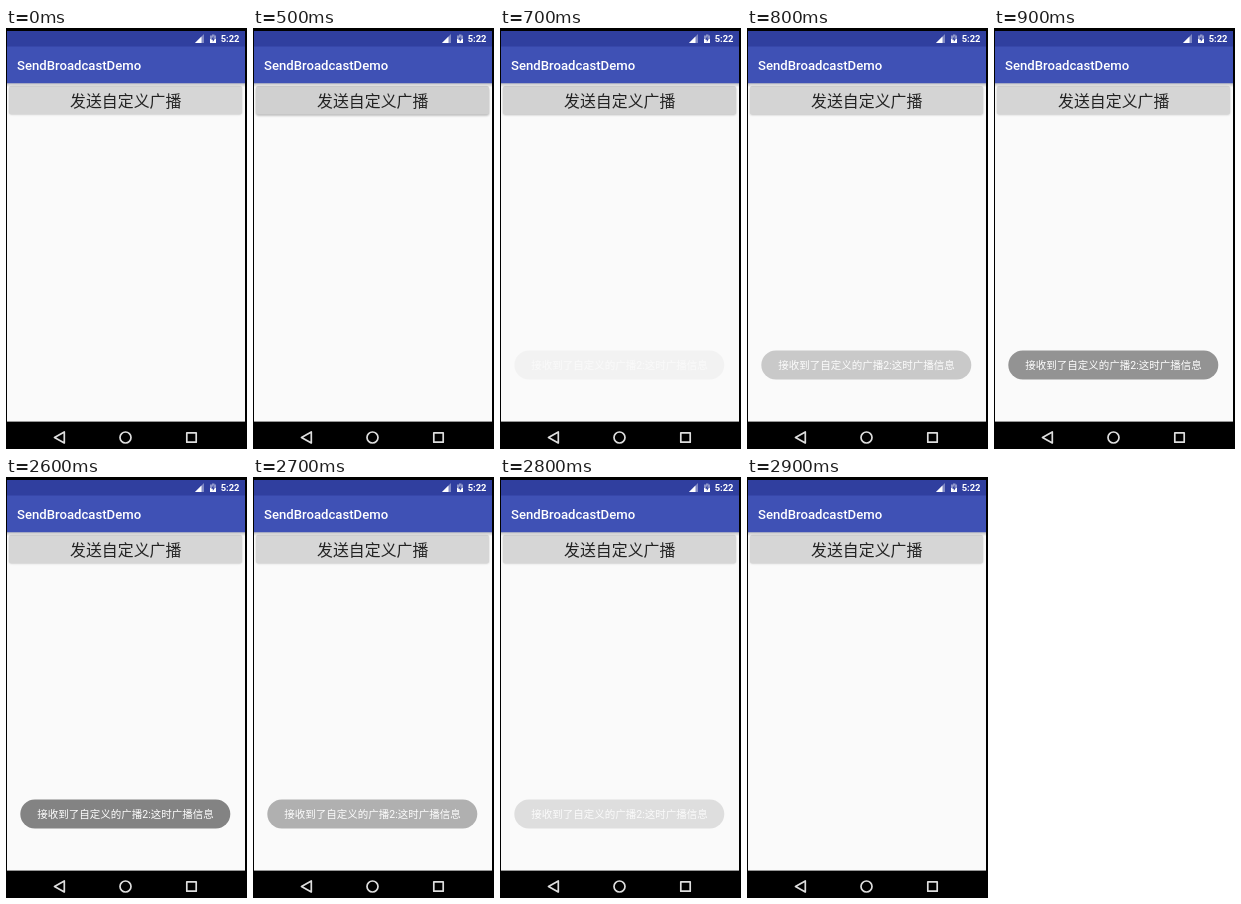
An HTML page that plays this animation: 241x421 px, repeating every 4000 ms.

```html
<!DOCTYPE html>
<html lang="zh-CN">
<head>
<meta charset="utf-8">
<style>
html, body { margin: 0; width: 100%; height: 100%; overflow: hidden; background: #000; }
svg { display: block; }
text { font-family: Roboto, "Noto Sans CJK SC", "Noto Sans CJK", sans-serif; }
.bold { font-weight: 500; fill: #fff; }
</style>
</head>
<body>
<svg width="241" height="421" viewBox="0 0 241 421">
  <defs>
    <linearGradient id="fade" x2="0" y2="1">
      <stop stop-opacity=".22"/><stop offset="1" stop-opacity="0"/>
    </linearGradient>
    <filter id="blur" x="-5%" y="-30%" width="110%" height="160%"><feGaussianBlur stdDeviation="1"/></filter>
  </defs>
  <rect width="241" height="421"/>
  <rect x="1" y="55" width="238" height="338.6" fill="#fafafa"/>
  <rect id="shadow" x="3" width="233" height="28" rx="2" filter="url(#blur)"/>
  <rect id="button" x="3" y="58" width="233" height="28.5" rx="2"/>
  <text x="119.7" y="78.8" font-size="15.9" font-weight="300" text-anchor="middle" fill="#222">发送自定义广播</text>

  <rect x="1" y="3" width="238" height="16" fill="#303f9f"/>
  <rect x="1" y="18.5" width="238" height="36.8" fill="#3f51b5"/>
  <rect x="1" y="55.3" width="238" height="4" fill="url(#fade)"/>
  <text class="bold" x="11" y="42" font-size="13.15">SendBroadcastDemo</text>
  <text class="bold" x="214.7" y="14.2" font-size="9.4" style="font-weight:700">5:22</text>
  <path d="M189 15L198 6V15Z" fill="#8089c4"/>
  <path d="M189 15L195.5 8.5V15Z" fill="#fff"/>
  <path d="M204 7.5H206V6.5H208.5V7.5H210V15H204Z" fill="#8f97cb"/>
  <path d="M204 11H210V15H204Z" fill="#fff"/>
  <path d="M207.6 8L205.2 11.8H206.8V14L208.9 10.8H207.4Z" fill="#303f9f"/>

  <g fill="none" stroke="#dedede" stroke-width="1.7" stroke-linejoin="round">
    <path d="M48.5 409.5L58.3 404V415Z"/>
    <circle cx="119.5" cy="409.5" r="5.5"/>
    <rect x="180.8" y="404.8" width="9.4" height="9.4"/>
  </g>

  <g id="toast">
    <rect x="14.3" y="322.4" width="210" height="29" rx="14.5" fill="#646464"/>
    <text x="119.5" y="341" font-size="10.5" text-anchor="middle" fill="#fff">接收到了自定义的广播2:这时广播信息</text>
  </g>
</svg>
<script>
const [toast, button, shadow] = ["toast", "button", "shadow"].map(id => document.getElementById(id));

// Progress from 0 to 1 between two times
const ramp = (t, from, to) => Math.min(1, Math.max(0, (t - from) / (to - from)));
const smooth = u => u * u * (3 - 2 * u);

function draw(now) {
  const t = Math.floor(now % 4000 / 100) * 100; // the screen refreshes every 100 ms
  const press = t < 500 ? 0 : 1 - ramp(t, 500, 1000);
  const grey = 214 - 6 * press;
  toast.setAttribute("opacity", smooth(ramp(t, 650, 1050)) - ramp(t, 2530, 2860));
  button.setAttribute("fill", `rgb(${grey},${grey},${grey})`);
  shadow.setAttribute("opacity", 0.18 + 0.12 * press);
  shadow.setAttribute("y", 58.5 + press);
  requestAnimationFrame(draw);
}
draw(performance.now());
</script>
</body>
</html>
```
